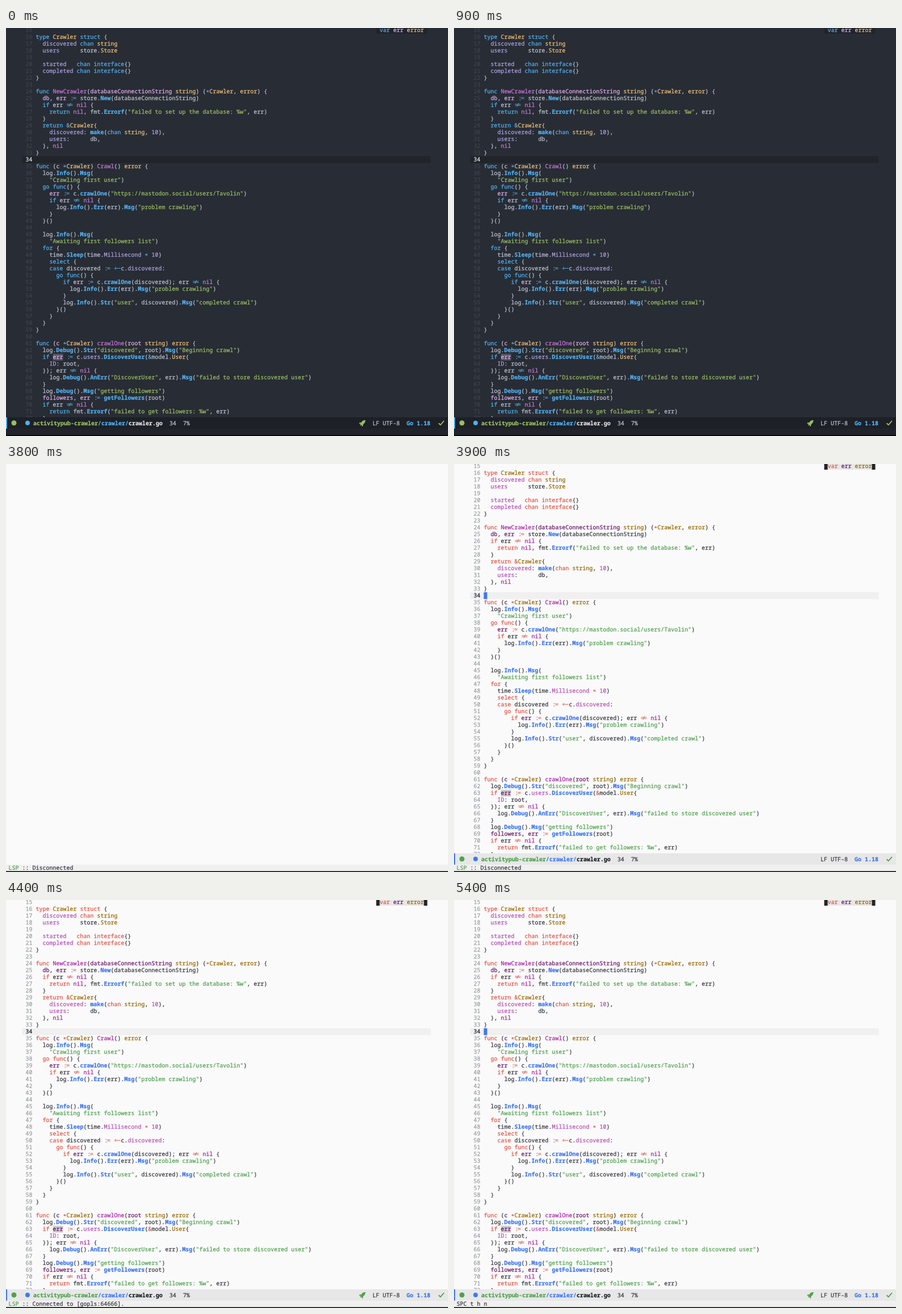
An HTML page with a canvas for the animation above (8 s loop, 779 px wide and 719 px high).

```html
<!DOCTYPE html>
<html lang="en">
<head>
<meta charset="utf-8">
<title>Editor theme switch</title>
<style>
html, body { margin: 0; width: 100%; height: 100%; overflow: hidden; background: #000; }
canvas { display: block; width: 779px; height: 719px; }
</style>
</head>
<body>
<canvas id="stage"></canvas>
<script>
const W = 779, H = 719, LOOP = 8000;
const CW = 6, LH = 12, FIRST = 15, TOP = -2, LEFT = 52.5, CURRENT = 34, MARKED = 63;
const BAR_TOP = 686, ECHO_TOP = 706;
const FONT = '10px "Noto Sans Mono", "DejaVu Sans Mono", monospace';

const dark = {
  bg: '#282c34', alt: '#21242b', bar: '#1d2026', fg: '#bbc2cf', strong: '#dfdfdf',
  num: '#3f444a', key: '#51afef', blue: '#51afef', fn: '#c678dd', prop: '#a9a1e1',
  vari: '#dcaeea', type: '#ecbe7b', str: '#98be65', mark: '#50535e', tip: '#21242b'
};
const light = {
  bg: '#fafafa', alt: '#f0f0f0', bar: '#e7e7e7', fg: '#383a42', strong: '#1b2229',
  num: '#9ca0a4', key: '#e45649', blue: '#4078f2', fn: '#a626a4', prop: '#b751b6',
  vari: '#6a1868', type: '#986801', str: '#50a14f', mark: '#cfcfcf', tip: '#e7e7e7'
};

const code = `
type Crawler struct {
  discovered chan string
  users      store.Store

  started   chan interface{}
  completed chan interface{}
}

func NewCrawler(databaseConnectionString string) (*Crawler, error) {
  db, err := store.New(databaseConnectionString)
  if err != nil {
    return nil, fmt.Errorf("failed to set up the database: %w", err)
  }
  return &Crawler{
    discovered: make(chan string, 10),
    users:      db,
  }, nil
}

func (c *Crawler) Crawl() error {
  log.Info().Msg(
    "Crawling first user")
  go func() {
    err := c.crawlOne("https://mastodon.social/users/Tavolin")
    if err != nil {
      log.Info().Err(err).Msg("problem crawling")
    }
  }()

  log.Info().Msg(
    "Awaiting first followers list")
  for {
    time.Sleep(time.Millisecond * 10)
    select {
    case discovered := <-c.discovered:
      go func() {
        if err := c.crawlOne(discovered); err != nil {
          log.Info().Err(err).Msg("problem crawling")
        }
        log.Info().Str("user", discovered).Msg("completed crawl")
      }()
    }
  }
}

func (c *Crawler) crawlOne(root string) error {
  log.Debug().Str("discovered", root).Msg("Beginning crawl")
  if err := c.users.DiscoverUser(&model.User{
    ID: root,
  }); err != nil {
    log.Debug().AnErr("DiscoverUser", err).Msg("failed to store discovered user")
  }
  log.Debug().Msg("getting followers")
  followers, err := getFollowers(root)
  if err != nil {
    return fmt.Errorf("failed to get followers: %w", err)
  }`.split('\n');

const KEYWORD = /^(type|struct|chan|interface|func|if|return|go|for|select|case|var)$/;
const TYPE = /^(Crawler|Store|User|string|error)$/;

// Colour name for one token, judged by the text around it.
function classify(word, before, after) {
  if (word[0] === '"') return 'str';
  if (/^(:=|!=|<-|[*&])$/.test(word)) return 'key';
  if (/^\d/.test(word)) return 'prop';
  if (!/^\w/.test(word)) return 'fg';
  if (KEYWORD.test(word)) return 'key';
  if (word === 'nil') return 'fn';
  if (after[0] === '(') return /^func (\(.*\) )?$/.test(before) ? 'fn' : 'call';
  if (TYPE.test(word)) return 'type';
  if (/\.$/.test(before) || /^:(?!=)/.test(after) || /^ +(chan|store)/.test(after)) return 'prop';
  if (/^(, \w+)? :=/.test(after) && !/case/.test(before)) return 'vari';
  if (/^ \*?(Crawler|string|error)/.test(after)) return 'vari';
  return 'fg';
}

function tokenize(line) {
  return [...line.matchAll(/"[^"]*"|\w+|:=|!=|<-|[^\s\w"]/g)].map(m => {
    const end = m.index + m[0].length;
    return { word: m[0], col: m.index, kind: classify(m[0], line.slice(0, m.index), line.slice(end)) };
  });
}

const lines = code.map(tokenize);
const tip = tokenize('var err error');

const canvas = document.getElementById('stage');
const ctx = canvas.getContext('2d');
const ratio = window.devicePixelRatio || 1;
canvas.width = W * ratio;
canvas.height = H * ratio;
ctx.scale(ratio, ratio);
ctx.lineJoin = 'round';
ctx.textRendering = 'geometricPrecision';

function rect(x, y, w, h, color) {
  ctx.fillStyle = color;
  ctx.fillRect(x, y, w, h);
}

// A hairline outline gives the glyphs a medium weight.
function text(s, x, y, color, bold) {
  ctx.font = (bold ? '700 ' : '500 ') + FONT;
  ctx.fillStyle = ctx.strokeStyle = color;
  ctx.lineWidth = .25;
  ctx.fillText(s, x, y);
  ctx.strokeText(s, x, y);
}

function stroke(color, width, ...paths) {
  ctx.strokeStyle = color;
  ctx.lineWidth = width;
  ctx.beginPath();
  for (const p of paths) {
    for (let i = 0; i < p.length; i += 2) ctx[i ? 'lineTo' : 'moveTo'](p[i], p[i + 1]);
  }
  ctx.stroke();
}

function disc(x, y, r, color) {
  ctx.fillStyle = color;
  ctx.beginPath();
  ctx.arc(x, y, r, 0, Math.PI * 2);
  ctx.fill();
}

// Operators that the editor font draws as ligatures or in its own shape.
const glyphs = {
  '!=': (x, y, color) => stroke(color, .9, [x + 1, y - 4.6, x + 11, y - 4.6],
    [x + 1, y - 2.4, x + 11, y - 2.4], [x + 4.4, y - .4, x + 7.6, y - 6.6]),
  '<-': (x, y, color) => stroke(color, .9, [x + 1, y - 3.5, x + 11.5, y - 3.5],
    [x + 3.6, y - 6, x + 1.2, y - 3.5, x + 3.6, y - 1]),
  ':=': (x, y, color) => {
    text(':', x + 1, y - .5, color);
    text('=', x + 5.5, y, color);
  },
  '*': (x, y, color) => stroke(color, .9, [x + .8, y - 3.5, x + 5.2, y - 3.5],
    [x + 1.9, y - 5.4, x + 4.1, y - 1.6], [x + 4.1, y - 5.4, x + 1.9, y - 1.6])
};

function drawTokens(tokens, x0, y, c) {
  for (const { word, col, kind } of tokens) {
    const x = x0 + col * CW, call = kind === 'call';
    const color = call ? c.blue : c[kind];
    if (glyphs[word]) glyphs[word](x, y, color);
    else text(word, x, y, color, call);
  }
}

function drawBuffer(c, cursor) {
  const rowTop = n => TOP + (n - FIRST) * LH;
  ctx.save();
  ctx.beginPath();
  ctx.rect(0, 0, W, BAR_TOP);
  ctx.clip();
  rect(28.5, rowTop(CURRENT), 720, LH, c.alt);
  rect(LEFT + 5 * CW, rowTop(MARKED), 3 * CW, LH, c.mark);
  lines.forEach((tokens, i) => {
    const n = FIRST + i, y = rowTop(n) + 9;
    text(String(n), LEFT - 3 * CW, y, n === CURRENT ? c.strong : c.num);
    drawTokens(tokens, LEFT, y, c);
  });
  if (cursor) rect(LEFT, rowTop(CURRENT), CW, LH, c.blue);
  rect(652.5, 0, 90, 10, dark.alt);
  rect(658.5, 0, 78, 10, c.tip);
  drawTokens(tip, 658.5, 7, c);
  ctx.restore();
}

function drawRocket(color) {
  ctx.save();
  ctx.translate(628.5, 696);
  ctx.rotate(Math.PI / 4);
  ctx.fillStyle = color;
  ctx.beginPath();
  ctx.moveTo(0, -7);
  ctx.quadraticCurveTo(3.6, -3.5, 2.2, 1);
  ctx.lineTo(4.2, 3);
  ctx.lineTo(3.8, 5.4);
  ctx.lineTo(1.4, 3.6);
  ctx.lineTo(0, 6.6);
  ctx.lineTo(-1.4, 3.6);
  ctx.lineTo(-3.8, 5.4);
  ctx.lineTo(-4.2, 3);
  ctx.lineTo(-2.2, 1);
  ctx.quadraticCurveTo(-3.6, -3.5, 0, -7);
  ctx.fill();
  ctx.restore();
}

function drawModeline(c, rocket) {
  const y = 699.5;
  rect(0, BAR_TOP, W, ECHO_TOP - BAR_TOP, c.bar);
  rect(0, BAR_TOP, 2, ECHO_TOP - BAR_TOP, c.blue);
  disc(14, 696, 4.5, c.str);
  disc(38, 696, 4, c.blue);
  text('activitypub-crawler', 48, y, c.str, true);
  text('/crawler/', 162, y, c.blue, true);
  text('crawler.go', 216, y, c.strong, true);
  text('34', 288, y, c.fg);
  text('7%', 312, y, c.fg);
  if (rocket) drawRocket(c.str);
  text('LF UTF-8', 646, y, c.fg);
  text('Go 1.18', 706, y, c.blue, true);
  stroke(c.str, 1.8, [762.5, 696.3, 765.7, 699.5, 771.8, 692.3]);
}

function drawEcho(c, message) {
  rect(0, ECHO_TOP, W, LH, c.alt);
  const lsp = message.startsWith('LSP');
  text(lsp ? message.slice(4) : message, lsp ? 28.5 : 4.5, 715, c.fg);
  if (lsp) text('LSP', 4.5, 715, c.str);
  rect(0, 717.5, W, 2, '#000');
}

const messages = [
  [0, ''], [1300, 'SPC t h n'], [3800, 'LSP :: Disconnected'], [4000, 'go-mode restarted'],
  [4100, 'LSP :: Connected to [gopls:64666].'], [5000, ''], [5400, 'SPC t h n']
];

function stateAt(t) {
  return {
    isLight: t >= 3800,
    blank: t >= 3800 && t < 3900,
    cursor: (t >= 400 && t < 900) || (t >= 3900 && t < 4400) || t >= 4900,
    rocket: t < 3800 || t >= 4100,
    message: messages.filter(m => m[0] <= t).pop()[1]
  };
}

function draw(s) {
  const c = s.isLight ? light : dark;
  rect(0, 0, W, H, c.bg);
  if (!s.blank) {
    drawBuffer(c, s.cursor);
    drawModeline(c, s.rocket);
  }
  drawEcho(c, s.message);
}

const start = performance.now();
let shown = '';

function tick() {
  const s = stateAt((performance.now() - start) % LOOP);
  const id = JSON.stringify(s);
  if (id !== shown) {
    shown = id;
    draw(s);
  }
  requestAnimationFrame(tick);
}
tick();
</script>
</body>
</html>
```
